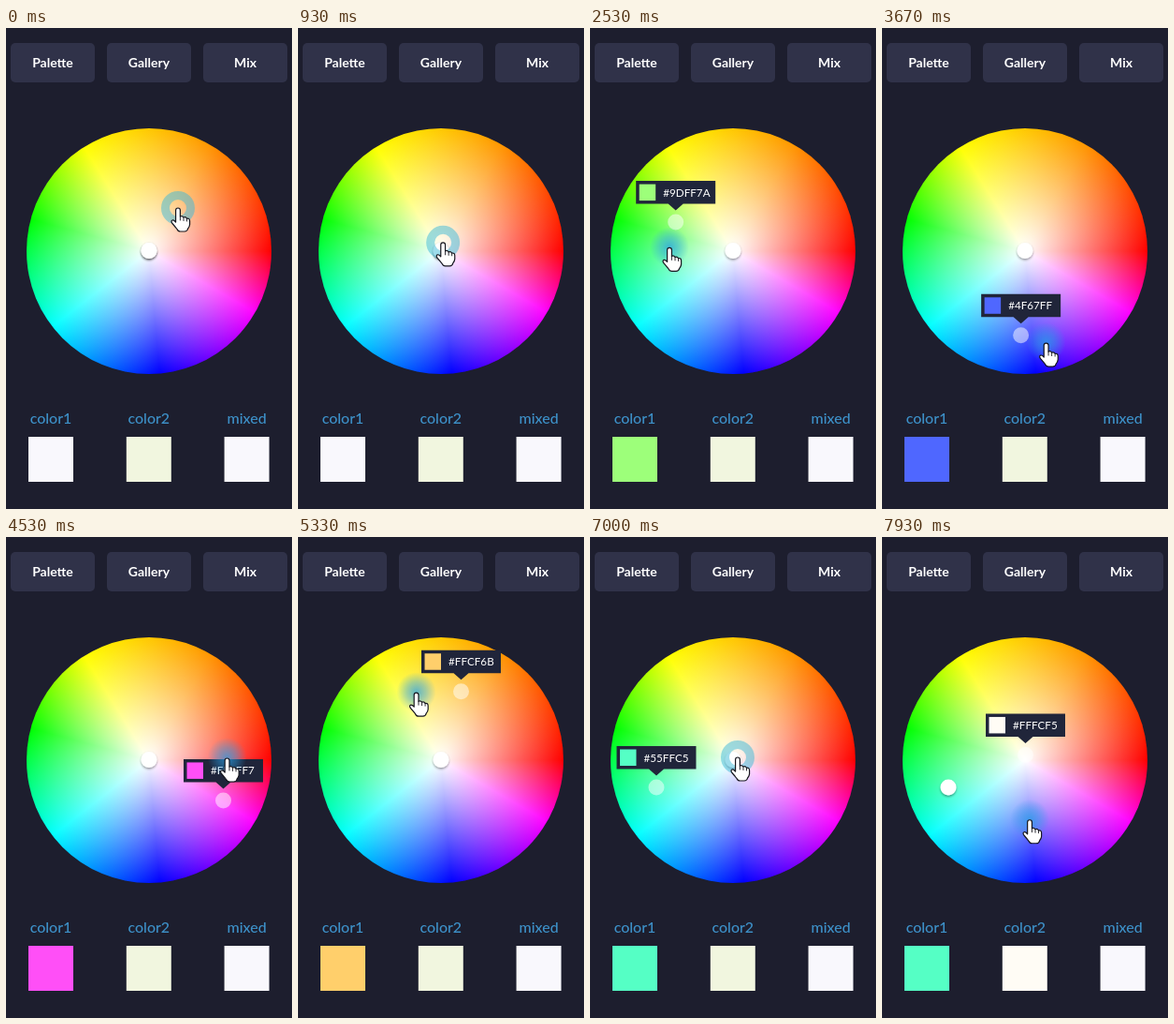
An HTML page that plays this animation: 306 px wide and 513 px high, repeating every 8000 ms.

```html
<!DOCTYPE html>
<html lang="en">
<head>
<meta charset="utf-8">
<title>Color mixer</title>
<style>
  html, body { margin: 0; width: 100%; height: 100%; overflow: hidden; background: #1d1e2e; }
  #wheel {
    position: absolute; left: 22px; top: 106.5px; width: 262px; height: 262px; border-radius: 50%;
    background:
      radial-gradient(closest-side, #fff, #fff0),
      conic-gradient(from 90deg, #f00, #f0f 30deg, #00f 85deg, #0ff 142deg,
        #0f0 195deg, #ff0 238deg, #ff9500 300deg, #f00);
  }
  svg { position: absolute; left: 0; top: 0; display: block; }
  text { font-family: Lato, "Open Sans", sans-serif; }
  .tab { fill: #303249; }
  .tabText { fill: #fff; font-size: 14px; font-weight: 700; text-anchor: middle; }
  .label { fill: #3d91c9; font-size: 16px; font-weight: 500; text-anchor: middle; }
  .handle { fill: #fff; }
  #tipText { fill: #fff; font-size: 11.7px; }
</style>
</head>
<body>
<div id="wheel"></div>
<svg width="306" height="513" viewBox="0 0 306 513">
  <defs>
    <radialGradient id="glowFill">
      <stop offset="0" stop-color="#28a0e6" stop-opacity=".75"/>
      <stop offset=".5" stop-color="#28a0e6" stop-opacity=".42"/>
      <stop offset="1" stop-color="#28a0e6" stop-opacity="0"/>
    </radialGradient>
    <filter id="shadow" x="-50%" y="-50%" width="200%" height="200%">
      <feDropShadow dx="0" dy="1.5" stdDeviation="1" flood-color="#000" flood-opacity=".4"/>
    </filter>
  </defs>
  <g id="panel"></g>
  <circle id="handle2" class="handle" r="8.5"/>
  <circle id="handle1" class="handle" r="8.5"/>
  <g id="tip">
    <path d="M-42.5 -44h85v24.5H8L0 -12.5L-8 -19.5H-42.5z" fill="#20253a"/>
    <rect id="tipColor" x="-39" y="-40.5" width="17.5" height="17.5"/>
    <text id="tipText" x="-13.5" y="-27.5"></text>
  </g>
  <g id="cursor">
    <circle id="ring" r="13.5" fill="none" stroke="#3cb9d7" stroke-opacity=".5" stroke-width="9"/>
    <circle id="glow" cy="-1" r="21" fill="url(#glowFill)"/>
    <g stroke="#16161e" stroke-width="1.2" stroke-linejoin="round" stroke-linecap="round">
      <path fill="#fff" d="M-2.4 2.4Q-2.4 0 0 0T2.4 2.4V9Q4.5 7.8 6 10Q8.3 9 9.5 11.2Q12.6 10.6 12.6 14V17.5Q12.4 20 10.6 22Q10 25 7 25H2.5Q0 25 -1 22.5Q-3 20 -6 16.5Q-8 13.8 -6 13Q-4.5 12.4 -2.4 15Z"/>
      <path fill="none" stroke-width=".9" d="M2.4 9V13M6 10.3V13.5M9.5 11.4V14"/>
    </g>
  </g>
</svg>
<script>
const LOOP = 8000, STEP = 1000 / 15;
const CENTER = { x: 153, y: 237.5 }, RADIUS = 131;
const LAG = 280;                       // the handle trails the pointer
const DRAG1 = [1470, 6500], DRAG2 = [7400, LOOP];
const RELEASE1 = 7100;                 // when the first tooltip closes

const $ = id => document.getElementById(id);

// pointer path: time, x, y
const path = [
  [0, 184, 192], [530, 184, 192], [1000, 153.5, 231], [1470, 153.5, 231],
  [1520, 153.7, 229.8], [1800, 152, 216], [2250, 92, 207], [2530, 85, 234],
  [2950, 99, 291], [3390, 149, 328], [3670, 176, 336], [4100, 224, 302],
  [4600, 234, 226], [5050, 175, 165], [5330, 127, 166], [5800, 80, 205],
  [6300, 71, 267], [6500, 71, 267], [6950, 158, 235], [7400, 158, 235],
  [7650, 153.5, 232], [7930, 158, 301], [8000, 158, 312]
];

// wheel angle paired with hue, red-yellow-blue spacing
const hueMap = [[0, 0], [60, 35], [122, 60], [165, 120], [218, 180], [275, 240], [330, 300], [360, 360]];

function slope(i, k) {
  const prev = path[i - 1], here = path[i], next = path[i + 1];
  const still = p => !p || (p[1] === here[1] && p[2] === here[2]);
  return still(prev) || still(next) ? 0 : (next[k] - prev[k]) / (next[0] - prev[0]);
}

function pointerAt(t) {
  let i = path.findIndex(p => p[0] > t) - 1;
  if (i < 0) i = path.length - 2;
  const span = path[i + 1][0] - path[i][0];
  const u = Math.min(1, (t - path[i][0]) / span), v = 1 - u;
  const hermite = k =>
    path[i][k] * (1 + 2 * u) * v * v + slope(i, k) * span * u * v * v +
    path[i + 1][k] * u * u * (3 - 2 * u) - slope(i + 1, k) * span * u * u * v;
  return { x: hermite(1), y: hermite(2) };
}

function colorAt({ x, y }) {
  const dx = x - CENTER.x, dy = CENTER.y - y;
  const angle = (Math.atan2(dy, dx) * 180 / Math.PI + 360) % 360;
  const sat = Math.min(1, Math.hypot(dx, dy) / RADIUS);
  const i = hueMap.findIndex(m => m[0] > angle);
  const [a0, h0] = hueMap[i - 1], [a1, h1] = hueMap[i];
  const hue = (h0 + (h1 - h0) * (angle - a0) / (a1 - a0)) / 60;
  const channel = n => {
    const k = (n + hue) % 6;
    const value = 1 - sat * Math.max(0, Math.min(k, 4 - k, 1));
    return Math.round(value * 255).toString(16).padStart(2, "0");
  };
  return ("#" + channel(5) + channel(3) + channel(1)).toUpperCase();
}

function place(el, { x, y }) {
  el.setAttribute("transform", `translate(${x.toFixed(2)} ${y.toFixed(2)})`);
}

function setHandle(el, pos, active) {
  place(el, pos);
  el.setAttribute("fill-opacity", active ? .5 : 1);
  el.setAttribute("filter", active ? "none" : "url(#shadow)");
}

$("panel").innerHTML = [
  ["Palette", "color1", "#f9f8fd"], ["Gallery", "color2", "#f1f6df"], ["Mix", "mixed", "#f9f8fd"]
].map(([tab, label, color], i) => {
  const x = 50 + i * 103, mid = 48 + i * 104.8;
  return `<rect class="tab" x="${x - 45}" y="16" width="90" height="42" rx="5"/>
    <text class="tabText" x="${x}" y="42">${tab}</text>
    <text class="label" x="${mid}" y="422">${label}</text>
    <rect id="${label}" x="${mid - 24}" y="436" width="48" height="48" fill="${color}"/>`;
}).join("");

const within = (t, [from, to]) => t >= from && t < to;

function draw(t) {
  const started1 = t >= DRAG1[0] + LAG, active1 = started1 && t < RELEASE1;
  const active2 = t >= DRAG2[0] + LAG;
  const pos1 = started1 ? pointerAt(Math.min(t - LAG, DRAG1[1])) : CENTER;
  const pos2 = active2 ? pointerAt(t - LAG) : CENTER;
  const color1 = colorAt(pos1), color2 = colorAt(pos2);

  setHandle($("handle1"), pos1, active1);
  setHandle($("handle2"), pos2, active2);
  $("color1").setAttribute("fill", started1 ? color1 : "#f9f8fd");
  $("color2").setAttribute("fill", active2 ? color2 : "#f1f6df");

  const tipColor = active2 ? color2 : color1;
  $("tip").style.display = active1 || active2 ? "" : "none";
  place($("tip"), active2 ? pos2 : pos1);
  $("tipColor").setAttribute("fill", tipColor);
  $("tipText").textContent = tipColor;

  const pressed = within(t, DRAG1) || within(t, DRAG2);
  place($("cursor"), pointerAt(t));
  $("ring").style.display = pressed ? "none" : "";
  $("glow").style.display = pressed ? "" : "none";
}

const start = performance.now();
function frame() {
  const t = (performance.now() - start) % LOOP;
  draw(Math.floor((t + 4) / STEP) * STEP % LOOP);
  requestAnimationFrame(frame);
}
frame();
</script>
</body>
</html>
```
